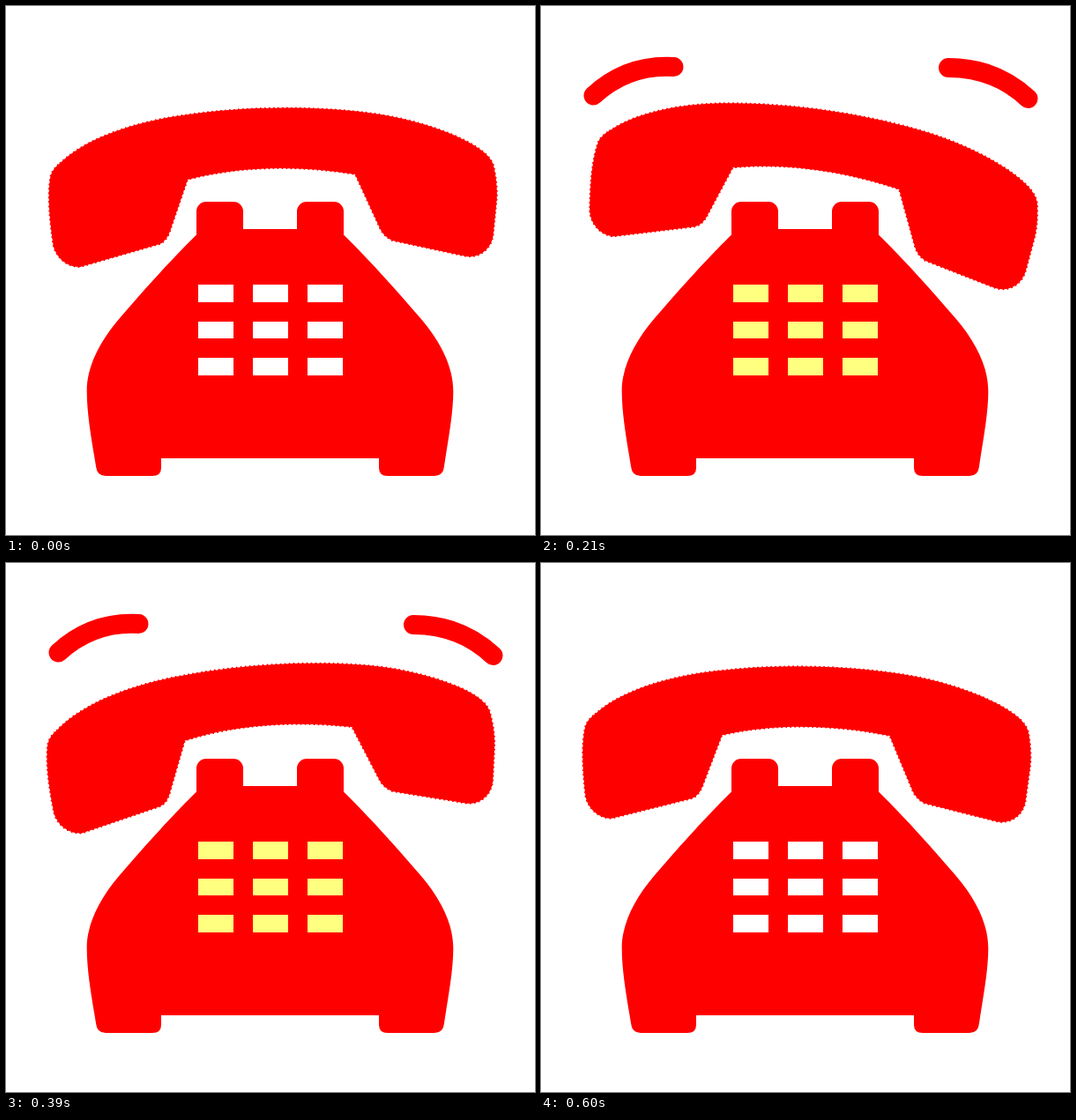
Animation, 600 px wide and 600 px high, one loop 0.63 s. Source, as an HTML page:

```html
<!DOCTYPE html>
<html lang="en">
<head>
<meta charset="utf-8">
<title>Ringing phone</title>
<style>
  html, body { margin: 0; width: 100%; height: 100%; overflow: hidden; background: #fff; }
  svg { display: block; width: 100%; height: 100%; }
</style>
</head>
<body>
<svg viewBox="0 0 600 600" fill="#f00">
  <path d="M216 259.5V233A11 11 0 0 1 227 222H258A11 11 0 0 1 269 233V253H330V233A11 11 0 0 1 341 222H372A11 11 0 0 1 383 233V259.5
    C415.5 291.5 445 325 470 354C494 382 507.3 410 507.3 437C507.3 465 500 500 497 522Q496 533 486 533H433Q423 533 423 524V513
    H176V524Q176 533 166 533H113Q103 533 102 522C98.5 500 91.7 465 91.7 437C91.7 410 105 382 129 354C154 325 183.5 291.5 216 259.5Z"/>
  <g id="keys" shape-rendering="crispEdges"></g>
  <g id="arcs" fill="none" stroke="#f00" stroke-width="22" stroke-linecap="round">
    <path d="M59.5 101.5C85 78 115 67 150.5 69"/>
    <path d="M462 70C495 70 527 81 552.5 105"/>
  </g>
  <!-- the dotted stroke gives the handset its slightly rough edge -->
  <path id="handset" stroke="#f00" stroke-width="2" stroke-linecap="round" stroke-dasharray="0 5"
    d="M61.5 178C96 145 160 129 204 123.5C268 114 345 113 410 121C462 127 522 147 544.5 168Q552.5 176 553.5 183
    C556.5 197 557.5 211 556.5 221L552.5 261C549.5 277 536 286 522 284L438 266Q428 261 424 252L396 191
    C330 180 262 182 206 197L187.5 251Q183.5 266 174.5 270L84 296C66 296 55.5 282 53.5 271
    C49.5 244 46.5 214 50.5 193Q52.5 185 61.5 178Z"/>
</svg>
<script>
  const STEP = 30, COUNT = 21, SPAN = 5;
  const PIVOT = '296 262';
  // handset pose every SPAN steps: turn in degrees, shift x, shift y
  const POSES = [[0, 0, 0], [13.9, 0, 0], [2.3, 0, 0], [-6.3, 0, 0], [2.05, -3, 1.4]];

  const [keys, arcs, handset] = ['keys', 'arcs', 'handset'].map(id => document.getElementById(id));

  for (const [y, h] of [[316, 20], [358, 19], [399, 20]]) {
    for (const x of [218, 280, 342]) {
      const key = document.createElementNS('http://www.w3.org/2000/svg', 'rect');
      Object.entries({ x, y, width: 40, height: h }).forEach(([k, v]) => key.setAttribute(k, v));
      keys.append(key);
    }
  }

  function pose(step) {
    const i = Math.min(Math.floor(step / SPAN), POSES.length - 2);
    const u = step / SPAN - i;
    return POSES[i].map((a, k) => a + (POSES[i + 1][k] - a) * u);
  }

  function draw(ms) {
    const step = Math.floor(ms / STEP) % COUNT;
    const lit = step % 2 === 1;
    const [turn, dx, dy] = pose(step);
    handset.setAttribute('transform', `translate(${dx} ${dy}) rotate(${turn} ${PIVOT})`);
    keys.setAttribute('fill', lit ? '#ffff80' : '#fff');
    arcs.setAttribute('visibility', lit ? 'visible' : 'hidden');
  }

  let start;
  function tick(now) {
    start ??= now;
    draw(Math.max(0, now - start));
    requestAnimationFrame(tick);
  }
  draw(0);
  requestAnimationFrame(tick);
</script>
</body>
</html>
```
